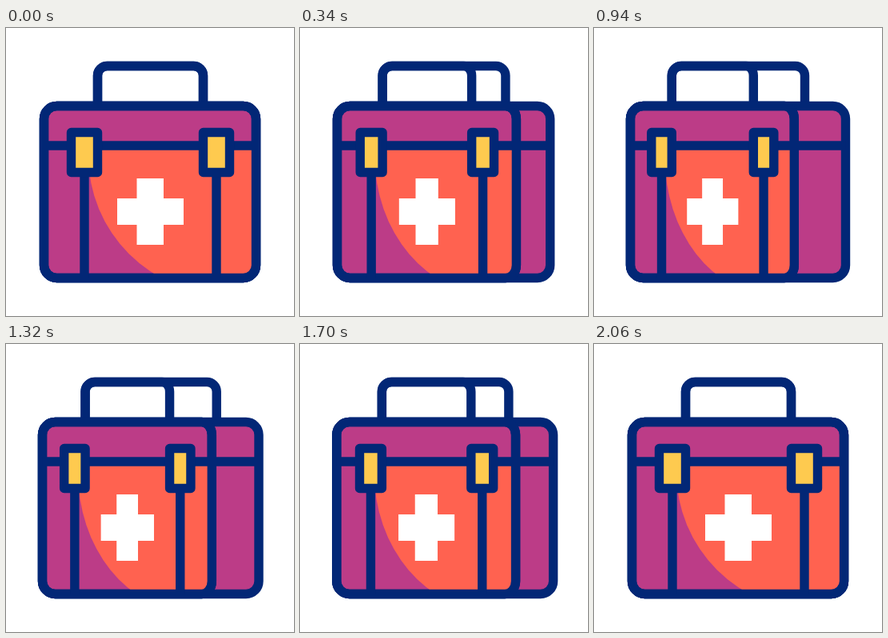
Animation, 360 px wide and 360 px high, one loop 2.4 s. Source, as an HTML page with a canvas:

```html
<!DOCTYPE html>
<html>
<head>
<meta charset="utf-8">
<title>First aid kit</title>
<style>
  html, body { margin: 0; width: 100%; height: 100%; overflow: hidden; background: #fff; }
  canvas { display: block; width: 360px; height: 360px; }
</style>
</head>
<body>
<canvas id="stage" width="360" height="360"></canvas>
<script>
const ctx = document.getElementById('stage').getContext('2d');
const LOOP = 2400;
const NAVY = '#022776', PURPLE = '#bc3c87', ORANGE = '#ff6250', YELLOW = '#feca4f';

// Centre lines of the moving upright edges, keyed over the loop
const times = [10, 340, 640, 940, 1320, 1700, 2060];
const leftKeys = [47.5, 46.5, 45.7, 45.5, 45.5, 45.8, 47.5];
const frontKeys = [312.5, 270.5, 246.6, 250.3, 257.3, 269.5, 312.5];
const backKeys = [312.5, 312.7, 313.7, 314.5, 316, 316.6, 312.5];

// Monotone cubic interpolation, at rest on both ends
function track(keys, t) {
  const last = times.length - 1;
  if (t <= times[0]) return keys[0];
  if (t >= times[last]) return keys[last];
  const rate = i => (keys[i + 1] - keys[i]) / (times[i + 1] - times[i]);
  const slope = i => {
    if (i === 0 || i === last) return 0;
    const a = rate(i - 1), b = rate(i);
    return a * b > 0 ? 2 * a * b / (a + b) : 0;
  };
  let i = 0;
  while (t > times[i + 1]) i++;
  const h = times[i + 1] - times[i], u = (t - times[i]) / h, v = 1 - u;
  return v * v * (1 + 2 * u) * keys[i] + u * u * (3 - 2 * u) * keys[i + 1]
    + h * u * v * (v * slope(i) - u * slope(i + 1));
}

function box(x1, y1, x2, y2, radii, fill) {
  ctx.beginPath();
  ctx.roundRect(x1, y1, x2 - x1, y2 - y1, radii);
  if (fill) {
    ctx.fillStyle = fill;
    ctx.fill();
  }
  ctx.stroke();
}

function line(x1, y1, x2, y2) {
  ctx.beginPath();
  ctx.moveTo(x1, y1);
  ctx.lineTo(x2, y2);
  ctx.stroke();
}

function draw(t) {
  const left = track(leftKeys, t);
  const front = track(frontKeys, t);
  const back = track(backKeys, t);
  const scale = (front - left) / 265;
  const px = x => left + (x - 47.5) * scale;
  const turned = r => [r, { x: r * scale, y: r }, { x: r * scale, y: r }, r];

  ctx.fillStyle = '#fff';
  ctx.fillRect(0, 0, 360, 360);
  ctx.strokeStyle = NAVY;
  ctx.lineWidth = 11.4;
  ctx.lineJoin = 'round';

  // Handles; their lower ends are hidden by the case
  box(px(114.5), 47.5, back - 66 * scale, 130, 12);
  box(px(114.5), 47.5, px(246.5), 130, turned(12));

  // Case with its side, then the front face
  box(left, 97.5, back, 312.5, 16, PURPLE);
  box(left, 97.5, front, 312.5, turned(16), PURPLE);
  ctx.save();
  ctx.clip();
  ctx.beginPath();
  ctx.rect(left, 147, front - left, 166);
  ctx.clip();
  ctx.beginPath();
  ctx.ellipse(px(276), 160, 173 * scale, 173, 0, 0, 2 * Math.PI);
  ctx.fillStyle = ORANGE;
  ctx.fill();
  ctx.restore();
  box(left, 97.5, front, 312.5, turned(16));

  line(left, 147, back, 147);
  for (const x of [98, 263]) {
    line(px(x), 155, px(x), 312.5);
    box(px(x - 16.5), 130.5, px(x + 16.5), 180.5, 0, YELLOW);
  }

  ctx.fillStyle = '#fff';
  ctx.fillRect(px(139), 213, 83 * scale, 33);
  ctx.fillRect(px(163.5), 188, 33.5 * scale, 83);
}

const start = performance.now();
function tick() {
  draw((performance.now() - start) % LOOP);
  requestAnimationFrame(tick);
}
tick();
</script>
</body>
</html>
```
